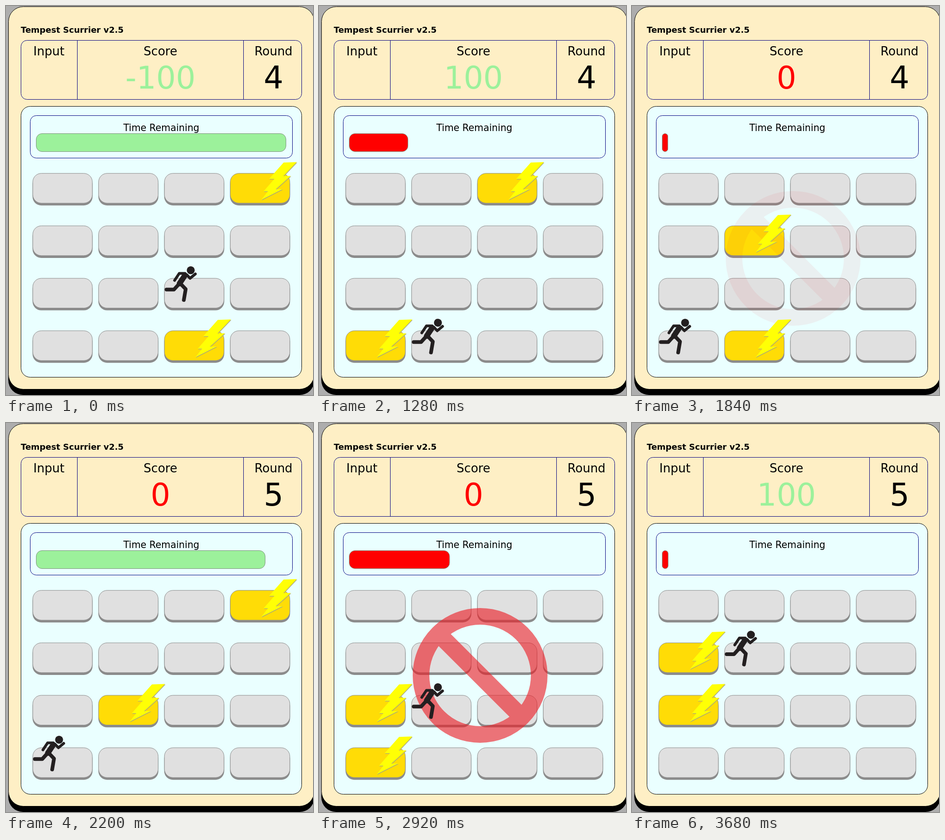
An HTML page for the animation above (3.72 s loop, 665x843 px).

```html
<!DOCTYPE html>
<html lang="en">
<head>
<meta charset="utf-8">
<title>Tempest Scurrier</title>
<style>
  html, body { margin: 0; width: 100%; height: 100%; overflow: hidden; background: #adadad; }
  svg { display: block; width: 665px; height: 843px; }
  text { font-family: "DejaVu Sans", sans-serif; text-anchor: middle; }
  .label { font-size: 26px; }
  .big { font-size: 67px; }
  .box { fill: none; stroke: #000080; }
  .limb { fill: none; stroke: #231f20; stroke-linecap: round; stroke-linejoin: round; }
</style>
</head>
<body>
<svg viewBox="0 0 665 843">
  <defs>
    <path id="boltShape" d="M116 -23L144.500 -24L115.500 6.500L131.500 6L99 35L114 34.500L67.500 58L82 39.500L72.500 39.500L96 12.500L84.500 12.500Z"/>
    <g id="bolt">
      <use href="#boltShape" x="0.800" y="1.200" fill="#aaa67c"/>
      <use href="#boltShape" fill="#ffff05"/>
    </g>
  </defs>

  <rect width="665" height="843" fill="#adadad"/>
  <rect x="5" y="14" width="663" height="829" rx="32"/>
  <rect x="5.500" y="1.500" width="662" height="829" rx="32" fill="#feefc5" stroke="#000"/>
  <text x="32" y="58" style="text-anchor:start;font-size:18px;font-weight:bold">Tempest Scurrier v2.5</text>

  <rect class="box" x="32.500" y="74.500" width="608" height="128" rx="13"/>
  <path class="box" d="M154.500 74V202M514.500 74V202"/>
  <text class="label" x="93" y="107">Input</text>
  <text class="label" x="334.500" y="107">Score</text>
  <text class="label" x="579.500" y="107">Round</text>
  <text class="big" id="score" x="334.500" y="179"></text>
  <text class="big" id="round" x="579.500" y="179"></text>

  <rect x="32.500" y="217.500" width="608" height="587" rx="20" fill="#eaffff" stroke="#000"/>
  <rect class="box" x="52.500" y="237.500" width="568" height="92" rx="13"/>
  <text x="336.500" y="271" style="font-size:20.400px">Time Remaining</text>
  <rect id="bar" x="65.500" y="276.500" height="39" stroke="#7d907d"/>

  <g id="tiles"></g>
  <g id="sign" fill="none" stroke="#ed1c24" stroke-width="36">
    <circle cx="349" cy="547" r="128"/>
    <path d="M264 462L434 632" stroke-width="37"/>
  </g>
  <use class="bolt" href="#bolt"/>
  <use class="bolt" href="#bolt"/>
  <g id="runner">
    <circle cx="57.500" cy="-17" r="8.600" fill="#231f20"/>
    <path class="limb" stroke-width="12" d="M45 -6L33 12"/>
    <path class="limb" stroke-width="6" d="M45 -10H32.500L22.500 5M49 -7L56 0.500L67.500 -9"/>
    <path class="limb" stroke-width="8" d="M31 14L21 25H5M36 13L46.500 24L42.500 47.500"/>
  </g>
</svg>

<script>
const LOOP = 3720, LEAD = 18, SLOT = 466, ROUND = SLOT * 4;
const GREEN = '#9cf19b', RED = '#ff0000';
const FADE = 250;

// One entry per strike: two lit cells [column, row], score, colour, hit flag
const strikes = [
  { lit: [[3, 0], [2, 3]], score: -100, tint: GREEN },
  { lit: [[0, 1], [3, 1]], score: 0, tint: GREEN },
  { lit: [[2, 0], [0, 3]], score: 100, tint: GREEN },
  { lit: [[1, 1], [1, 3]], score: 0, tint: RED, hit: true },
  { lit: [[3, 0], [1, 2]], score: 0, tint: RED },
  { lit: [[2, 1], [3, 3]], score: 100, tint: GREEN },
  { lit: [[0, 2], [0, 3]], score: 0, tint: RED, hit: true },
  { lit: [[0, 1], [0, 2]], score: 100, tint: GREEN }
];

// Runner hops: start time, column, row
const hops = [
  [0, 2, 2], [280, 2, 3], [800, 1, 3], [1520, 0, 3],
  [2480, 0, 2], [2880, 1, 2], [3200, 1, 1]
];

const byId = id => document.getElementById(id);
const score = byId('score'), round = byId('round'), bar = byId('bar');
const sign = byId('sign'), runner = byId('runner'), tiles = byId('tiles');
const bolts = document.querySelectorAll('.bolt');

const set = (el, attrs) => {
  for (const key in attrs) el.setAttribute(key, attrs[key]);
  return el;
};
const addRect = attrs => tiles.appendChild(
  set(document.createElementNS('http://www.w3.org/2000/svg', 'rect'), attrs));
const cellX = col => 57.5 + col * 142.6;
const cellY = row => 362.2 + row * 113.7;
const moveTo = (el, [col, row]) =>
  set(el, { transform: `translate(${cellX(col)} ${cellY(row)})` });
const swing = x => 0.5 - Math.cos(Math.PI * Math.min(1, Math.max(0, x))) / 2;

const faces = [];
for (let i = 0; i < 16; i++) {
  const x = cellX(i % 4), y = cellY(Math.floor(i / 4));
  addRect({ x, y: y + 4.5, width: 130, height: 65.5, rx: 19, fill: '#8b8b8b' });
  faces.push(addRect({ x: x + 0.5, y: y + 0.5, width: 129, height: 64.5, rx: 18.5, stroke: '#8c8c8c' }));
}

function draw(t) {
  const clock = t + LEAD;
  const slot = Math.min(7, Math.floor(clock / SLOT));
  const { lit, score: points, tint, hit } = strikes[slot];
  const late = slot > 3 ? 1 : 0;

  score.textContent = points;
  set(score, { fill: tint });
  round.textContent = 4 + late;

  const width = 542 - 529 * swing((clock - late * ROUND) / 1880);
  const radius = Math.min(12.5, (width - 1) / 2);
  set(bar, { width: width - 1, rx: radius, ry: radius, fill: width > 271 ? GREEN : RED });

  faces.forEach((face, i) => {
    const on = lit.some(([col, row]) => row * 4 + col === i);
    set(face, { fill: on ? '#ffdc06' : '#e0e0e0' });
  });
  lit.forEach((cell, i) => moveTo(bolts[i], cell));

  const age = clock - slot * SLOT;
  const alpha = swing(age / FADE) - swing((age - FADE) / FADE);
  set(sign, { opacity: hit ? alpha : 0 });

  const hop = hops.filter(h => h[0] <= t).pop();
  moveTo(runner, hop.slice(1));
}

const start = performance.now();
function tick(now) {
  draw(Math.max(0, now - start) % LOOP);
  requestAnimationFrame(tick);
}
draw(0);
requestAnimationFrame(tick);
</script>
</body>
</html>
```
